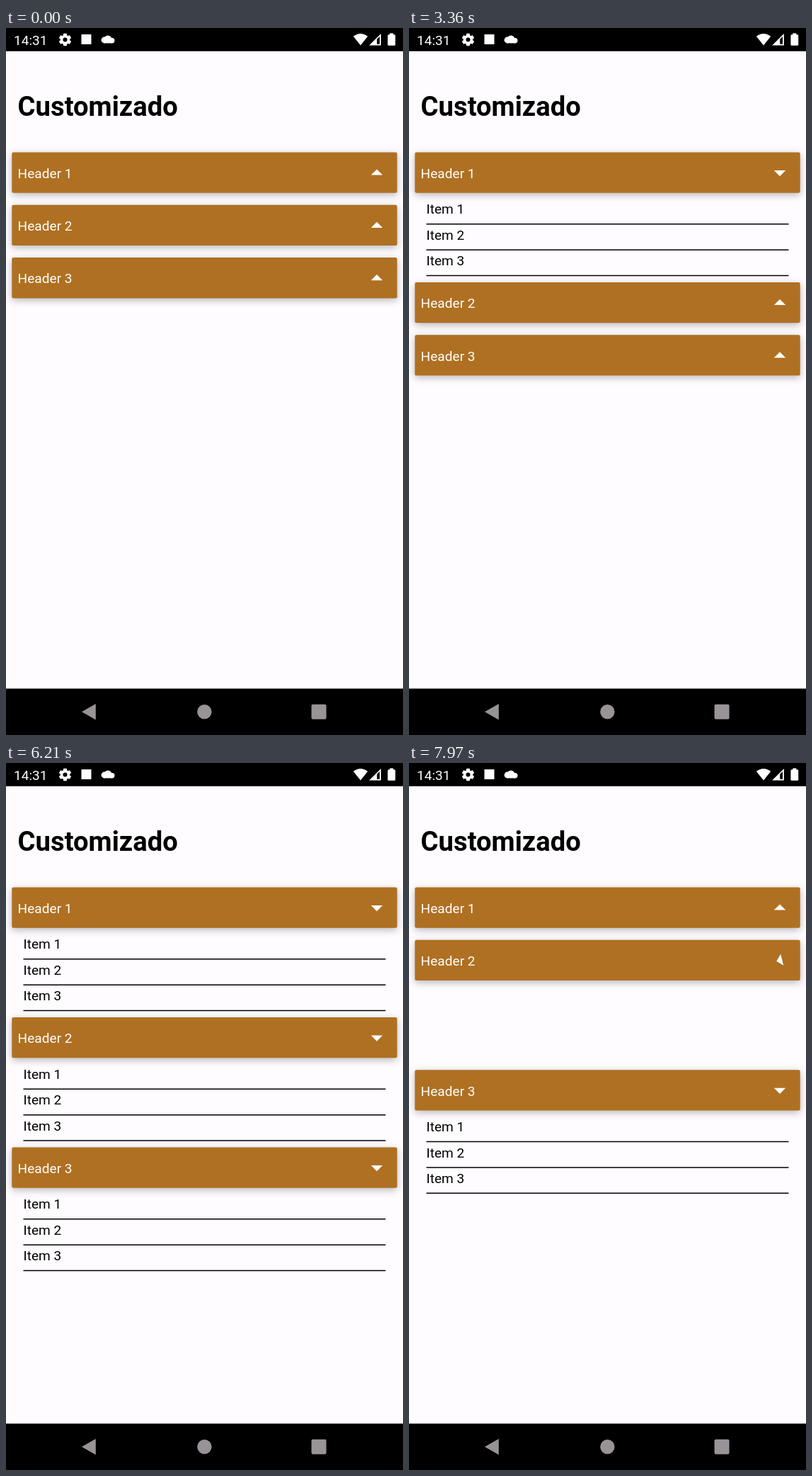
Write an HTML page with a canvas that moves like this. It is 561 px wide and 998 px high and loops after 8 s.

```html
<!DOCTYPE html>
<html lang="pt">
<head>
<meta charset="utf-8">
<title>Customizado</title>
<style>
  html, body { margin: 0; width: 100%; height: 100%; overflow: hidden; background: #fefcfe; }
  canvas { display: block; width: 561px; height: 998px; }
</style>
</head>
<body>
<canvas id="stage"></canvas>
<script>
const W = 561, H = 998, LOOP = 8000, PHASE = 300;
const FONT = 'Roboto, "Noto Sans", sans-serif';
const CARD = { x: 8.3, top: 175.4, w: 544.4, h: 57.4, gap: 16.9, grow: 109.2 };
const ITEM_STEP = 36.4;

// Tap times of each section, in ms.
const sections = [
  { open: 1770, close: 6439 },
  { open: 3569, close: 7836 },
  { open: 4680, close: Infinity }
];

const canvas = document.getElementById('stage');
const ctx = canvas.getContext('2d');
const dpr = window.devicePixelRatio || 1;
canvas.width = Math.round(W * dpr);
canvas.height = Math.round(H * dpr);

function progress(t, start) {
  const k = Math.min(1, Math.max(0, (t - start) / PHASE));
  return (1 - Math.cos(Math.PI * k)) / 2;
}

function text(str, x, y, color, size = 19.1, weight = 400) {
  ctx.font = `${weight} ${size}px ${FONT}`;
  ctx.fillStyle = color;
  ctx.fillText(str, x, y);
}

function poly(color, ...pts) {
  ctx.fillStyle = color;
  ctx.beginPath();
  for (let i = 0; i < pts.length; i += 2) ctx.lineTo(pts[i], pts[i + 1]);
  ctx.closePath();
  ctx.fill();
}

function disc(color, x, y, r) {
  ctx.fillStyle = color;
  ctx.beginPath();
  ctx.arc(x, y, r, 0, Math.PI * 2);
  ctx.fill();
}

function box(color, x, y, w, h, r = 0) {
  ctx.fillStyle = color;
  ctx.beginPath();
  ctx.roundRect(x, y, w, h, r);
  ctx.fill();
}

function gear(x, y) {
  ctx.save();
  ctx.translate(x, y);
  for (let i = 0; i < 6; i++) {
    poly('#fff', -3.2, -4, -2.2, -8.7, 2.2, -8.7, 3.2, -4);
    ctx.rotate(Math.PI / 3);
  }
  disc('#fff', 0, 0, 6.6);
  disc('#000', 0, 0, 3);
  ctx.restore();
}

function cloud() {
  disc('#fff', 139, 17, 4.4);
  disc('#fff', 144, 15.8, 5.4);
  disc('#fff', 149.8, 17.7, 3.7);
  box('#fff', 138.5, 16, 11.5, 5.4);
}

function statusBar() {
  box('#000', 0, 0, W, 32.8);
  text('14:31', 11, 24, '#fff');
  gear(83.5, 16.5);
  box('#fff', 106.5, 9, 14, 14);
  cloud();

  ctx.fillStyle = '#fff';
  ctx.beginPath();
  ctx.moveTo(501, 24.4);
  ctx.lineTo(490.8, 11.8);
  ctx.quadraticCurveTo(501, 4.2, 511.2, 11.8);
  ctx.fill();

  poly('#fff', 529.8, 8, 529.8, 24.4, 513.2, 24.4);
  poly('#000', 524.2, 15.8, 528, 12, 528, 22.7, 524.2, 22.7);

  box('#fff', 539.4, 9.2, 10.8, 15.6, 1.5);
  box('#fff', 542.3, 7.4, 5, 3);
}

function navBar() {
  const gray = '#979397';
  box('#000', 0, 932.6, W, H - 932.6);
  poly(gray, 107, 965.2, 126.8, 953.9, 126.8, 976.6);
  disc(gray, 280.4, 965.2, 10.2);
  box(gray, 431.6, 954.8, 21, 21, 2);
}

function arrow(x, y, turn) {
  ctx.save();
  ctx.translate(x, y);
  ctx.rotate(-Math.PI * turn);
  poly('#fff', -8.2, 3.3, 0, -4.9, 8.2, 3.3);
  ctx.restore();
}

function card(n, y, turn) {
  ctx.save();
  ctx.shadowColor = 'rgba(0,0,0,.28)';
  ctx.shadowBlur = 11 * dpr;
  ctx.shadowOffsetY = 3 * dpr;
  box('#af7022', CARD.x, y, CARD.w, CARD.h, 2.2);
  ctx.restore();
  text('Header ' + n, 16.6, y + 36.4, '#fff');
  arrow(524, y + 28.9, turn);
}

function items(y, alpha) {
  if (alpha <= 0) return;
  ctx.globalAlpha = alpha;
  for (let i = 0; i < 3; i++) {
    const top = y + i * ITEM_STEP;
    text('Item ' + (i + 1), 24.5, top + 86.9, '#000');
    box('#000', 24.5, top + 100.6, 512, 1.5);
  }
  ctx.globalAlpha = 1;
}

function draw(t) {
  ctx.setTransform(dpr, 0, 0, dpr, 0, 0);
  box('#fefcfe', 0, 0, W, H);
  text('Customizado', 16.6, 123.6, '#000', 38.2, 700);

  let y = CARD.top;
  sections.forEach(({ open, close }, i) => {
    const turn = progress(t, open) - progress(t, close);
    const room = progress(t, open) - progress(t, close + PHASE);
    const alpha = t < close ? progress(t, open + PHASE) : 0;
    card(i + 1, y, turn);
    items(y, alpha);
    y += CARD.h + CARD.gap + CARD.grow * room;
  });

  statusBar();
  navBar();
}

const start = performance.now();
function tick() {
  draw((performance.now() - start) % LOOP);
  requestAnimationFrame(tick);
}
tick();
</script>
</body>
</html>
```
